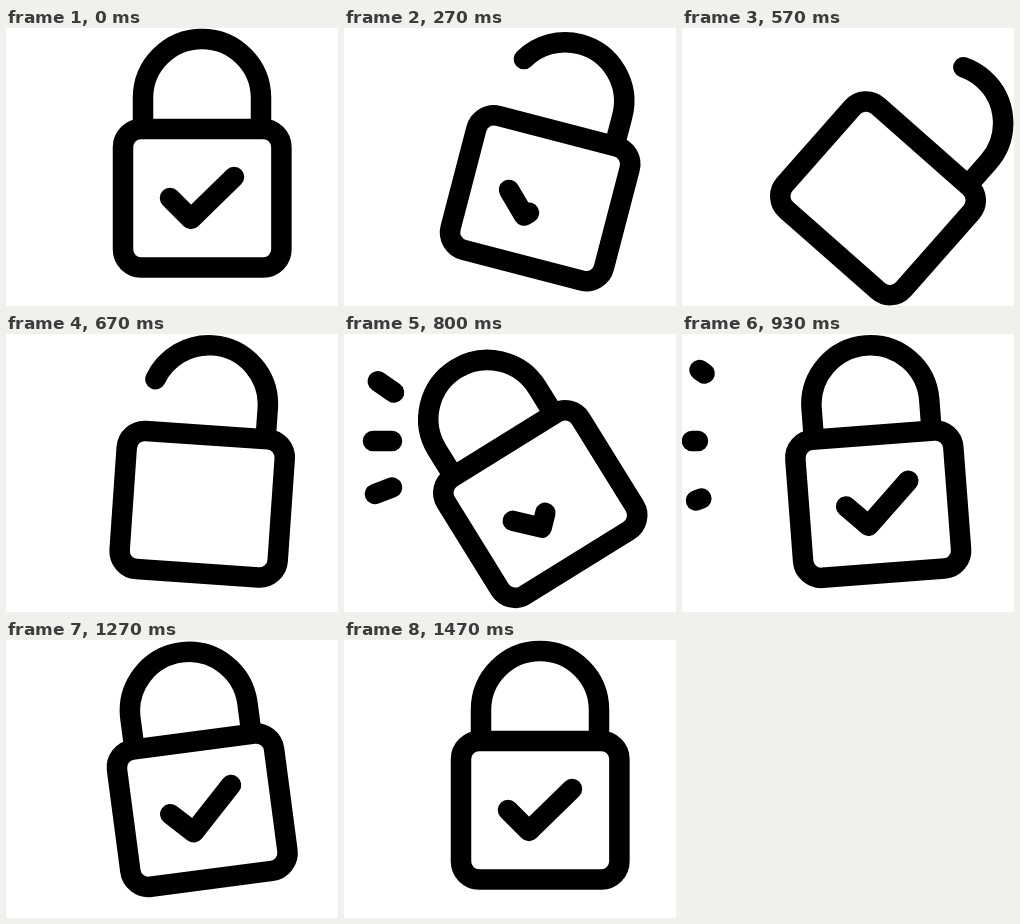
Recreate the animation shown at these times as an HTML page. Size 332x278 px, loop 1670 ms.

```html
<!DOCTYPE html>
<html lang="en">
<head>
<meta charset="utf-8">
<title>Swinging lock</title>
<style>
  html, body { margin: 0; height: 100%; overflow: hidden; background: #fff; }
  svg { display: block; width: 100vw; height: 100vh; }
  svg * { fill: none; stroke: #000; stroke-width: 20.5; stroke-linecap: round; stroke-linejoin: round; }
</style>
</head>
<body>
<svg viewBox="0 0 332 278">
  <g id="lock">
    <rect x="117" y="101" width="158.4" height="138.4" rx="18"/>
    <path id="shackle" pathLength="1" d="M137 96V70A59 59 0 0 1 255 70V96"/>
    <path id="check" pathLength="1" d="M164 170L185 191L228 149"/>
  </g>
  <path class="spark" pathLength="1" d="M50 58.5L17.5 36"/>
  <path class="spark" pathLength="1" d="M48 107H10"/>
  <path class="spark" pathLength="1" d="M48 153.5L14 166.5"/>
</svg>
<script>
const LOOP = 1670, STEP = LOOP / 50;
const lock = document.getElementById('lock');
const shackle = document.getElementById('shackle');
const check = document.getElementById('check');
const sparks = document.querySelectorAll('.spark');

// Keys are [step, value] pairs; values ease in and out between them.
const SWING = [[2, 0], [17, 41.4], [23, -33.5], [32, 16.5], [38, -7.5], [44, 0]];
const OPENING = [[0, 0], [14, 0.403], [17, 0.403], [23, 0]];
const CHECK = [[0, 1], [14, 0], [21, 0], [27, 1]];
const SPARK_HEAD = [[22, 0], [26, 1]];
const SPARK_TAIL = [[25, 0], [29, 1]];

function tween(keys, t) {
  if (t <= keys[0][0]) return keys[0][1];
  for (let i = 1; i < keys.length; i++) {
    const [t0, a] = keys[i - 1], [t1, b] = keys[i];
    if (t < t1) {
      const x = (t - t0) / (t1 - t0);
      return a + (b - a) * x * x * (3 - 2 * x);
    }
  }
  return keys[keys.length - 1][1];
}

// Shows only the stretch of a path between two fractions of its length.
function trim(path, from, to) {
  path.style.visibility = to > from ? 'visible' : 'hidden';
  path.style.strokeDasharray = `${to - from} 3`;
  path.style.strokeDashoffset = -from;
}

function draw(now) {
  // The motion advances in 30 steps a second.
  const t = Math.floor(((now % LOOP) + 6) / STEP) % 50;
  lock.setAttribute('transform', `rotate(${tween(SWING, t)} 196 170)`);
  trim(shackle, tween(OPENING, t), 1);
  trim(check, 0, tween(CHECK, t));
  for (const spark of sparks) trim(spark, tween(SPARK_TAIL, t), tween(SPARK_HEAD, t));
}

const start = performance.now();
function loop() {
  draw(performance.now() - start);
  requestAnimationFrame(loop);
}
loop();
</script>
</body>
</html>
```
